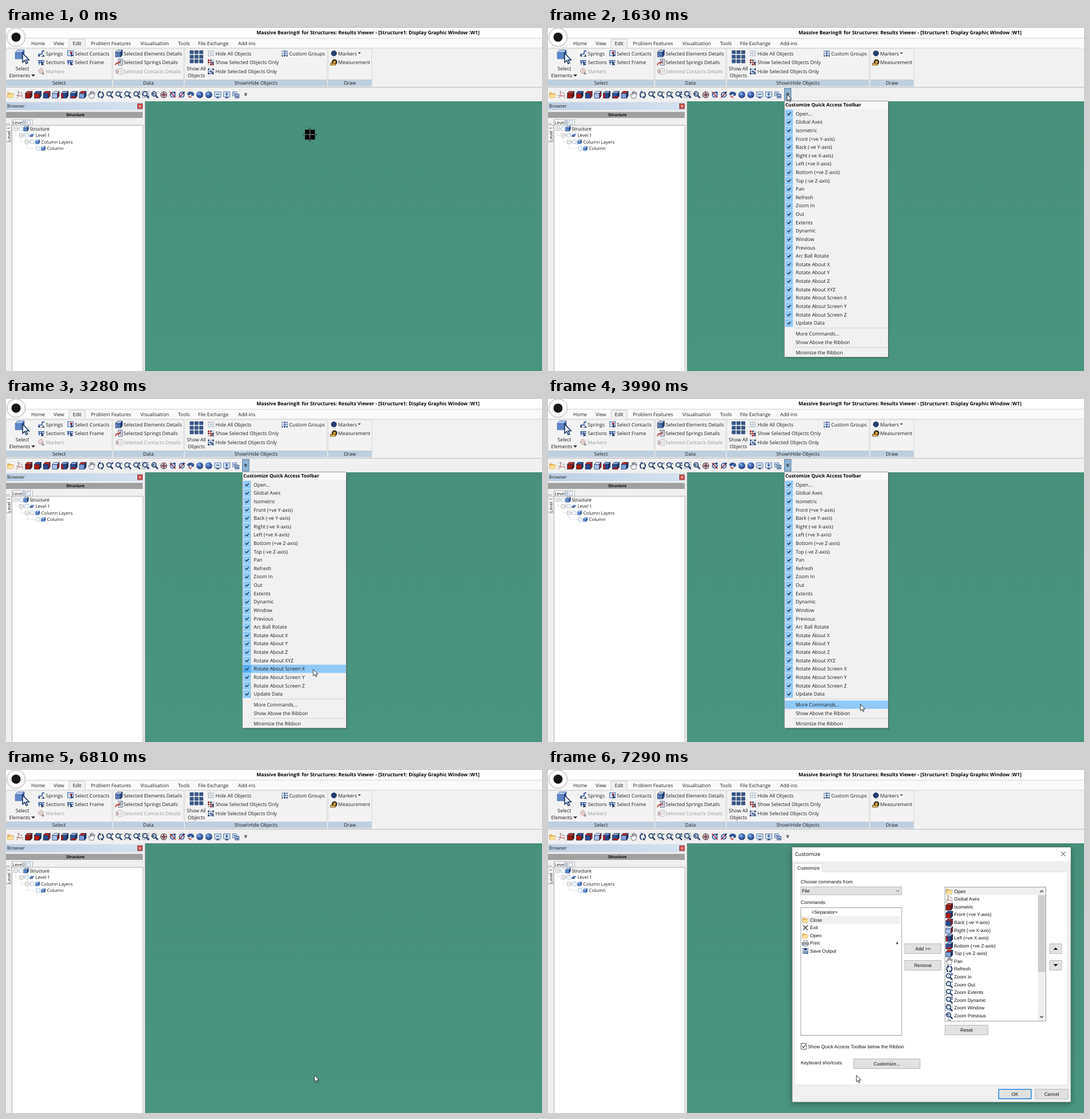
Write an HTML page that moves like this. It is 935 px wide and 599 px high and loops after 8 s.

```html
<!DOCTYPE html>
<html lang="en">
<head>
<meta charset="utf-8">
<title>Results viewer</title>
<style>
html, body { margin: 0; width: 100%; height: 100%; overflow: hidden; background: #f0f0f0; }
svg { display: block; text-rendering: geometricPrecision; }
text { font-family: "Open Sans", "Noto Sans", sans-serif; white-space: pre; }
text.a { font-family: "Liberation Sans", Arial, sans-serif; }
</style>
</head>
<body>
<svg id="stage" width="935" height="599" viewBox="0 0 935 599">
  <defs>
    <linearGradient id="green" x1="0" y1="0" x2="0" y2="1">
      <stop offset="0" stop-color="#48907b"/><stop offset="1" stop-color="#499580"/>
    </linearGradient>
    <linearGradient id="bar" x1="0" y1="0" x2="1" y2="0">
      <stop offset="0" stop-color="#bfd0e3"/><stop offset="1" stop-color="#d5e2ef"/>
    </linearGradient>
    <radialGradient id="ball" cx=".38" cy=".32" r=".7">
      <stop offset="0" stop-color="#8fb2e6"/><stop offset=".5" stop-color="#3a62ac"/><stop offset="1" stop-color="#1b3467"/>
    </radialGradient>
  </defs>
  <g id="base"></g>
  <g id="hover"></g>
  <g id="menu"></g>
  <g id="dialog" style="filter:drop-shadow(0 2px 4px rgba(0,0,0,.4))"></g>
  <g id="cross"></g>
  <g id="arrow"></g>
</svg>
<script>
const $ = id => document.getElementById(id);
const NAVY = '#1f3864', BLUE = '#34589c', RED = '#a81c14', INK = '#1c1c1c', DIM = '#9a9a9a';

// Markup helpers
const rect = (x, y, w, h, fill, stroke, extra = '') =>
  `<rect x="${x}" y="${y}" width="${w}" height="${h}" fill="${fill}" ${stroke ? `stroke="${stroke}" stroke-width=".8"` : ''} ${extra}/>`;
const shape = (d, fill, stroke = 'none', w = 1) =>
  `<path d="${d}" fill="${fill}" stroke="${stroke}" stroke-width="${w}"/>`;
const line = (d, stroke, w = 1) => shape(d, 'none', stroke, w);
const disc = (x, y, r, fill, stroke = 'none', w = 1) =>
  `<circle cx="${x}" cy="${y}" r="${r}" fill="${fill}" stroke="${stroke}" stroke-width="${w}"/>`;
// Text is placed by the middle of its capitals
const text = (x, y, str, size = 8.55, fill = INK, extra = '') =>
  `<text x="${x}" y="${y + size * .357}" font-size="${size}" fill="${fill}" ${extra}>${str.replace(/</g, '&lt;')}</text>`;
const mid = (x, y, str, size, fill, extra = '') => text(x, y, str, size, fill, 'text-anchor="middle" ' + extra);
const arial = (x, y, str, extra = '') => text(x, y, str, 8.25, '#111', 'class="a" ' + extra);
const at = (x, y, body, scale = 1) => `<g transform="translate(${x} ${y}) scale(${scale})">${body}</g>`;
const down = (x, y, r = 3) => shape(`M${x - r} ${y - r / 2}h${2 * r}l${-r} ${r}z`, '#222');
const grid = (x, y, w, h, gap, color) => {
  let s = '';
  for (let i = 0; i < 9; i++)
    s += rect(x + i % 3 * (w + gap), y + (i / 3 | 0) * (h + gap), w, h, Array.isArray(color) ? color[i % color.length] : color, '', 'rx=".8"');
  return s;
};

// Icons, about 12 px wide around 0,0
const cube = (front, side, top, edge = '#15294f') =>
  shape('M-6-2.5H3V6H-6z', front, edge, .7) +
  shape('M-6-2.5L-3-6H6L3-2.5z', top, edge, .7) +
  shape('M3-2.5L6-6V2.5L3 6z', side, edge, .7);
const zoom = mark =>
  line('M1.2 1L5.6 5.6', NAVY, 2.4) + disc(-1.3, -1.5, 3.8, '#dce6f3', NAVY, 1.6) + line(mark, NAVY, 1.1);
const turn = d => disc(0, 0, 4.2, '#c9d6ea', BLUE, 1.6) + line(d, RED, 1.4) + shape('M2-6L6-4L2.5-2z', NAVY);
const globe = disc(0, 0, 6, 'url(#ball)') + line('M-5.5 0H5.5M0-5.5Q3 0 0 5.5', '#6f93cf', .6);
const screen = d => rect(-5.5, -5, 11, 8.5, '#dbe7f5', BLUE) + line('M-3 5.3H3M0 3.5V5', NAVY, 1.3) + line(d, BLUE, 1.5);
const folder = shape('M-6-4h4l1 1.5h5V5H-6z', '#e0b35a') + shape('M-4-1H6L3.5 5H-6z', '#ffe3a0', '#cfa04a', .5);
const axes = line('M-2-6V2H6M-2 2L-6 6', '#b5554e', 1) + line('M-4-5.5h3M4 4l2 2M-6 1h3M1-4l4 3', '#55617c', .9);
const hand = shape('M-3 6L-6 0l1.4-.8L-3 1V-4.5h1.4V-1L-1-6H.5V-1L1.6-5.4H3L2.8-.5 4.3-3.5 5.5-3 4 3 2.5 6z', '#fff', '#4a4f5c', .8);
const swirl = line('M-2 5Q-7 0-2.5-4.5M2-5Q7 0 2.5 4.5', NAVY, 2) +
  shape('M-4.5-6H0V-2zM4.5 6H0V2z', NAVY);
const tools = [
  folder, axes,
  cube('#9c1a10', '#6d0d08', '#cf3a26'), cube('#b01c12', '#1c3768', '#34589c'),
  cube('#2a4a8c', '#a81c14', '#c22a1e'), cube('#a9c3ea', '#8e1a1a', '#dfeafa'),
  cube('#2a4a8c', '#16294f', '#7f9ccd') + rect(-6, -2, 3, 8, RED),
  cube('#2f5196', '#1b3467', '#8fabd8') + shape('M-6 6l3-3h8L3 6z', RED),
  cube('#7f9fd4', '#1c3768', '#c22a1e'),
  hand, swirl,
  zoom('M2.5-4.5h4M4.5-6.5v4'), zoom('M2.5-4.5h4'), zoom('M3-5.5l3 3M-6 5l2-2'),
  zoom('M2.5-4.5h4M4.5-6.5v4M2.5-1h4'),
  zoom('M0 0') + rect(-6, -6, 11, 11, 'none', NAVY, 'stroke-dasharray="1.5 1.2"'), zoom('M-3.5-1.5h4M-2-3l-1.5 1.5L-2 0'),
  disc(0, 0, 5.2, '#f0e4e4', '#555', 1.3) + line('M-5 0H5M0-5V5', RED, 1.2) + disc(0, 0, 2.4, 'none', NAVY, 1),
  turn('M-5-5L5 5'), turn('M-5 5L5-5'),
  shape('M-6-1Q-5-6 1-5 7-4 5 1L1 2Q3-1 0-1.5L-3 1z', BLUE, NAVY, .6) + line('M-4 2Q-2 5 1 4', RED, 1.6),
  globe, globe,
  screen('M-3-1H3'), screen('M0-4V2M-2.5-1h5'),
  rect(-5.5, -5, 7, 7, '#d7e3f3', BLUE) + rect(-1, -1, 6.5, 6.5, '#9db6dd', NAVY) + line('M1 3h3M-4-2h3', NAVY, 1.2)
];
const pointer = 'M0 0V11.5L2.7 9L4.4 13L6.2 12.2L4.5 8.4H8Z';

function drawBase() {
  let s = rect(0, 0, 935, 18, '#fff') + rect(0, 18, 935, 17, '#fafafa') + line('M34 17.8H935', '#c4c4c4', .8);
  s += text(826, 7.6, 'Massive Bearing® for Structures: Results Viewer - [Structure1: Display Graphic Window :W1]',
    8.55, '#000', 'font-weight="700" text-anchor="end"');
  s += rect(0, 35, 935, 68, '#f1f1f1') + line('M0 35H935', '#cfcfcf', .8) + line('M0 103.5H935', '#b2b2b2', .8);
  s += rect(110, 19.5, 28, 16, '#f1f1f1', '#c5c5c5', 'rx="1.5"') + rect(110.5, 33, 27, 3, '#f1f1f1');
  for (const [x, name] of [[44, 'Home'], [83, 'View'], [116.5, 'Edit'], [148, 'Problem Features'], [234.5, 'Visualisation'],
    [300, 'Tools'], [335, 'File Exchange'], [405, 'Add-ins']]) s += text(x, 27, name, 8.5);
  s += disc(17.5, 16, 16.3, '#f3f3f3', '#b5b5b5', 1) + disc(17.5, 16, 13.5, '#fff') + disc(17.5, 16, 8, '#161616');

  for (const [x, w, name] of [[0, 185, 'Select'], [187, 123, 'Data'], [312, 248, 'Show\\Hide Objects'], [562, 76, 'Draw']])
    s += rect(x, 36, w, 66, '#f3f3f3', '#d2d2d2') + rect(x, 90, w, 11.5, '#bfcfde') + mid(x + w / 2, 96, name);

  // Select
  s += at(24, 46, cube('#5f86c6', '#2c4f92', '#b4cbee', '#4a6fae'), 1.3) + at(29, 44, shape(pointer, '#e9f0fa', NAVY, 1.1), 1.4);
  s += mid(28.5, 71, 'Select') + text(5.5, 83, 'Elements') + down(47.5, 83, 3.6);
  const spring = line('M-5 4Q-6 0-2 1T1-2T5-4', BLUE, 1.7) + line('M0 5h5M2 2l3 3', NAVY, 1.2) + disc(-4, 4, 1.6, NAVY);
  const beam = line('M-6-3H5M-6 0H5M-4-3V4M0-3V4', BLUE, 1.4) + shape('M0-1V6l2-1.7 3 .2z', NAVY);
  const target = c => disc(-1, -1, 4, 'none', c, 1.1) + line('M-6-1H4M-1-6V4', c, .8) + shape('M1 0v6l2-1.5 3 .2z', '#8d8d8d');
  s += at(62, 44.5, spring) + text(69.5, 44.5, 'Springs') + at(62, 60, beam) + text(69.5, 60, 'Sections');
  s += at(62, 76, target('#c79a96')) + text(69.5, 76, 'Markers', 8.55, DIM);
  const contact = rect(-5.5, -5, 10, 9, '#cbd9ee', BLUE) + rect(-1, -3, 3.4, 3.4, RED) + shape('M0-1V6l2-1.7 3 .2z', NAVY);
  s += at(113, 44.5, contact) + text(120, 44.5, 'Select Contacts') + at(112.5, 60, beam) + text(120, 60, 'Select Frame');

  // Data
  const sheet = c => rect(-1, -5.5, 7, 10.5, '#fff', c) + line('M1-3h3.5M1-.5h3.5M1 2h3.5', c, .9);
  s += at(197, 44.5, cube('#6f93cf', '#20407c', '#c7d8f0') + line('M-4 0H2M-4 3H2', NAVY, 1.1)) + text(205, 44.5, 'Selected Elements Details');
  s += at(197, 60, sheet(NAVY) + line('M-6 5Q-5 0-2 1T2-3', RED, 1.5)) + text(205, 60, 'Selected Springs Details');
  s += at(197, 76, sheet('#aaa') + rect(-6, -4, 5, 8, '#c5c5c5') + rect(-3, -1, 3, 3, '#d49c98')) +
    text(205, 76, 'Selected Contacts Details', 8.55, DIM);

  // Show and hide
  s += grid(320.5, 39, 7, 6.6, 1.3, '#3a5685') + mid(332, 71, 'Show All') + mid(332, 83, 'Objects');
  const rows = [['Hide All Objects', '#bac4cf'], ['Show Selected Objects Only', [RED, '#33456b', '#bfc4cc', '#8f2020']],
    ['Hide Selected Objects Only', ['#26457d', '#aebbd0', NAVY, '#6d86b3']]];
  rows.forEach(([name, c], i) => {
    const y = 44.5 + 15.7 * i;
    s += grid(352, y - 5.2, 3, 2.8, .9, c) + text(365.5, y, name);
    if (i) s += at(359, y - 1, shape(pointer, NAVY, '#fff', .6), .5);
  });
  s += grid(480.5, 39.5, 3.2, 2.6, .9, ['#9cacc6', BLUE, '#7d92b8']) + line('M482 48v2M486 48v2M490 48v2', NAVY, 1.6) + text(494, 44.5, 'Custom Groups');

  // Draw
  s += disc(572, 44.3, 4.6, '#263f73', '#15294f', .7) + text(579.5, 44.5, 'Markers') + down(616.5, 44, 2.4);
  s += at(572, 60, disc(1, -.5, 4.8, '#2f2a1c') + disc(1, -.5, 2.4, '#d9a63a') + rect(-6, 1.5, 9, 3.4, '#e5b449', '#4b3a12')) + text(579.5, 60, 'Measurement');

  // Quick access row
  s += rect(0, 104, 935, 24, '#f0f0f0');
  tools.forEach((icon, i) => s += at(8.3 + 15.7 * i, 116.6, icon));

  // Browser panel
  s += rect(0, 128, 243, 471, '#f0f0f0') + rect(0, 129.5, 239, 14, 'url(#bar)') + text(2, 136.5, 'Browser', 8);
  s += rect(229.5, 132.2, 8.5, 8.8, '#c94f4a', '#8e3030') + line('M232 134.8l3.6 3.6M235.6 134.8l-3.6 3.6', '#fff', 1);
  s += rect(0, 146.5, 238.5, 10.5, '#a0a0a0') + mid(121, 151.6, 'Structure', 7.25, '#000', 'class="a" font-weight="700"');
  s += rect(10.5, 160, 36, 10, '#fafafa', '#a5a5a5') + text(11.5, 165.5, 'Leve', 7.8) + text(0, 165.5, '...', 8);
  s += rect(29, 162, 5.5, 6, '#e6edf5', '#8097b3') + line('M30.5 163.5l2 1.5-2 1.5', '#444', .7) + rect(37, 162, 5.5, 6, '#fff', '#8aa3c0');
  s += rect(0, 170, 10, 29, '#fafafa', '#a5a5a5') + at(4.8, 185.5, `<g transform="rotate(-90)">${mid(0, 0, 'Level 1', 7.9)}</g>`);
  s += rect(10.5, 170, 228.5, 430, '#fff', '#9a9a9a') + rect(41, 170.6, 35.5, 10.5, '#efefef');
  ['Structure', 'Level 1', 'Column Layers', 'Column'].forEach((name, i) => {
    const x = 10 * i, y = 175.8 + 11.5 * i;
    if (i) s += line(`M${x + 6.8} ${y - 8}V${y}h${i < 3 ? 6 : 15}`, '#cfcfcf', .6);
    if (i < 3) s += rect(x + 13.5, y - 3, 6.4, 6.2, '#fff', '#a8a8a8') + line(`M${x + 15} ${y}h3.4M${x + 20} ${y}h3`, '#777', .7);
    s += rect(x + 23, y - 3, 6, 6, '#fff', '#9db8d6');
    s += at(x + 35, y, i === 1 ? shape('M-6 2L-2-3H6L3 2z', '#5f88cc', BLUE, .9) + shape('M-6 2H3V4H-6z', NAVY)
      : cube('#5f88cc', '#23427c', '#b6cdef', i ? '#5478b4' : NAVY), i ? .62 : .72);
    s += text(x + 41.5, y, name, 7.9);
  });
  s += line('M242.5 128V599', '#a8a8a8', 1) + rect(243, 128, 692, 471, 'url(#green)');
  $('base').innerHTML = s;
}

const items = ['Open...', 'Global Axes', 'Isometric', 'Front (+ve Y-axis)', 'Back (-ve Y-axis)', 'Right (-ve X-axis)',
  'Left (+ve X-axis)', 'Bottom (+ve Z-axis)', 'Top (-ve Z-axis)', 'Pan', 'Refresh', 'Zoom In', 'Out', 'Extents', 'Dynamic',
  'Window', 'Previous', 'Arc Ball Rotate', 'Rotate About X', 'Rotate About Y', 'Rotate About Z', 'Rotate About XYZ',
  'Rotate About Screen X', 'Rotate About Screen Y', 'Rotate About Screen Z', 'Update Data'];
const STEP = 14.62, MORE = 26;
const rowY = i => i === MORE ? 534 : 149.6 + STEP * i;

function drawMenu() {
  let s = rect(414, 129, 181, 447.5, '#000', '', 'opacity=".28"') + rect(412.4, 127.4, 181, 447.4, '#f1f1f1', '#8b8b8b');
  s += rect(413, 128, 180, 13.5, '#fafafa') + text(414, 134.3, 'Customize Quick Access Toolbar', 8.3, '#000', 'font-weight="700"');
  s += rect(413, 0, 180, STEP - .2, '#91c9f7', '', 'id="lit"');
  items.forEach((name, i) => {
    const y = rowY(i);
    s += rect(413.6, y - 6.9, 13.6, 13.8, '#91c9f7') + line(`M417.6 ${y}l2.1 2.1 3.8-4.2`, '#10243c', 1.3) + text(432, y, name, 8.6);
  });
  s += rect(413.6, 0, 13.6, 13.8, '#56aff2', '', 'id="tick"') + line('M417.6 0l2.1 2.1 3.8-4.2', '#10243c', 1.3).replace('<path', '<path id="mark"');
  s += line('M430 524H592M430 557.8H592', '#d0d0d0', .9);
  s += text(432, 534, 'More Commands...', 8.6) + text(432, 548.5, 'Show Above the Ribbon', 8.6) + text(432, 567.2, 'Minimize the Ribbon', 8.6);
  $('menu').innerHTML = s;
  $('hover').innerHTML = rect(412.4, 105.4, 11.6, 20.6, '#8fb4d2', '#3f6a92');
}

function drawDialog() {
  const button = (x, y, w, h, name, edge = '#adadad') =>
    rect(x, y, w, h, '#e1e1e1', edge) + arial(x + w / 2, y + h / 2, name, 'text-anchor="middle"');
  let s = rect(426, 135, 486, 445, '#f0f0f0', '#7b8a86') + rect(426.4, 135.4, 485.2, 23.6, '#fff');
  s += text(431, 147, 'Customize', 9, '#000') + line('M895 142.6l8 8M903 142.6l-8 8', '#222', .9);
  s += rect(430.5, 178, 475.5, 372, '#fff', '#dcdcdc') + rect(430.5, 163.5, 47.5, 15, '#fff', '#d9d9d9') + rect(431, 176, 46.6, 4, '#fff');
  s += arial(435, 170.6, 'Customize') + arial(441, 194.7, 'Choose commands from:') + arial(441, 231, 'Commands:');
  s += rect(441, 204, 176, 14, '#e1e1e1', '#adadad') + arial(443, 211, 'File') + line('M607 209.6l3 3 3-3', '#444', .9);
  s += rect(441, 240.5, 176, 223, '#fff', '#828790') + rect(442, 255, 174.5, 13.5, '#f0f0f0');
  const cross = line('M-4.5-4.5L4.5 4.5M4.5-4.5L-4.5 4.5', '#444', 1.7);
  const printer = rect(-3.5, -5, 7, 4, '#fff', '#666') + rect(-6, -1.5, 12, 5, '#a4adba', '#566') + rect(-3.5, 2, 7, 3.4, '#dfe9f7', '#666');
  const disk = rect(-5, -5, 10, 10, '#c9d8ec', BLUE) + rect(-2.5, -5, 5, 3.5, NAVY) + line('M-3 1h4M-3 3h3', NAVY, 1) + disc(3, 3, 2, '#8ba6d2', NAVY, .8);
  [['<Separator>', ''], ['Close', folder], ['Exit', cross], ['Open', folder], ['Print', printer], ['Save Output', disk]].forEach(([name, icon], i) => {
    const y = 248.3 + 13.55 * i;
    s += at(449, y, icon, .92) + arial(icon ? 457 : 459.5, y, name);
  });
  s += shape('M608 300.2v4.6l2.8-2.3z', '#111');
  s += button(622.4, 303.4, 63.2, 17.2, 'Add >>') + button(622.4, 332.4, 63.2, 17.2, 'Remove');
  s += rect(692.5, 204.4, 176, 234, '#fff', '#828790') + rect(693.2, 205, 161, 13.3, '#f0f0f0');
  const zooms = { 12: 'Zoom Out', 13: 'Zoom Extents', 14: 'Zoom Dynamic', 15: 'Zoom Window', 16: 'Zoom Previous' };
  for (let i = 0; i < 17; i++) {
    const y = 211.7 + 13.58 * i;
    s += at(700, y, tools[i]) + arial(708.5, y, zooms[i] || items[i].replace('...', ''));
  }
  s += line('M697 437.4Q700 435.6 703 437.4', '#555', 1.1);
  s += rect(854.5, 205, 13.4, 233, '#f0f0f0') + rect(854.8, 218.5, 12.8, 134.5, '#cdcdcd');
  s += line('M858.2 213.5l3-3 3 3M858.2 429.5l3 3 3-3', '#444', 1.3);
  s += button(875, 303.4, 21, 17.2, '') + shape('M881.5 314h8l-4-4z', '#111') + button(875, 332.4, 21, 17, '') + shape('M881.5 339h8l-4 4z', '#111');
  s += button(692.5, 445.4, 75, 17.2, 'Reset');
  s += rect(441.3, 477.5, 9.6, 10, '#fff', '#333') + line('M443.4 482.4l2.2 2.4 3.8-5', '#222', 1.1);
  s += arial(453.5, 482.8, 'Show Quick Access Toolbar below the Ribbon') + arial(441, 510.6, 'Keyboard shortcuts:');
  s += button(533, 504.4, 116, 17.2, 'Customize...') + button(786, 557.6, 57, 16.6, 'OK', '#0078d7') +
    rect(786.3, 557.9, 56.4, 16, 'none', '#0078d7') + button(850, 557.6, 57, 16.6, 'Cancel');
  $('dialog').innerHTML = s;
}

drawBase();
drawMenu();
drawDialog();
// The drop-down mark sits above its own highlight
$('hover').insertAdjacentHTML('afterend', line('M415.6 114.3h5', '#111', 1) + down(418.1, 117.2, 2.6));
$('arrow').innerHTML = shape(pointer, '#fff', '#111', .85);
$('cross').innerHTML = rect(-8.4, -8.4, 17.2, 17.2, '#000') + line('M-11.5 0H12M0-12V12', '#111', 2.2) + line('M-11 0H11.5M0-11.5V11.5', '#b9c4c0', .7);

// Motion: the screen refreshes in bursts of [first, last, count], on a 10 ms clock
const LOOP = 8000;
const bursts = [[370, 1010, 10], [1390, 2110, 10], [2200, 2970, 11], [3040, 3760, 10], [3860, 3990, 3], [5070, 5220, 3]];
const path = [[300, 530, 186], [1010, 417, 116], [1630, 417, 116], [2110, 505, 172], [2500, 540, 279], [2970, 537, 405],
  [3280, 536, 472], [3760, 540, 523.5], [3990, 545, 533], [4990, 545, 533], [5220, 538, 533]];

function snap(t) {
  let last = 0;
  for (const [a, b, n] of bursts)
    for (let k = 0; k < n; k++) {
      const step = a + 10 * Math.floor((b - a) * k / (n - 1) / 10);
      if (step <= t) last = step;
    }
  return last;
}

function place(t) {
  if (t <= path[0][0]) return path[0].slice(1);
  const i = path.findIndex(p => p[0] >= t);
  if (i < 0) return path[path.length - 1].slice(1);
  const [a, b] = [path[i - 1], path[i]];
  let p = (t - a[0]) / (b[0] - a[0]);
  if (i === 1) p = p * p * (3 - 2 * p);
  return [a[1] + (b[1] - a[1]) * p, a[2] + (b[2] - a[2]) * p];
}

const show = (id, on) => $(id).setAttribute('visibility', on ? 'visible' : 'hidden');

function render(t) {
  const now = snap(t), [x, y] = place(now);
  const inView = y >= 128 && t < 1010;
  show('cross', inView);
  show('arrow', !inView);
  $(inView ? 'cross' : 'arrow').setAttribute('transform', `translate(${x} ${y})`);
  show('hover', !inView && t < 6810);

  const open = t >= 1390 && t < 6810;
  show('menu', open);
  $('menu').setAttribute('opacity', t < 1470 ? .4 : t < 1550 ? .75 : t < 1630 ? .95 : 1);
  // The lit row trails the pointer slightly
  const hy = place(now - 30)[1];
  const row = hy > 526 ? MORE : Math.min(25, Math.floor((hy - 142.3) / STEP));
  const lit = open && t >= 1630 && row >= 0;
  show('lit', lit);
  show('tick', lit && row < MORE);
  show('mark', lit && row < MORE);
  $('lit').setAttribute('y', rowY(row) - STEP / 2);
  $('tick').setAttribute('y', rowY(row) - 6.9);
  $('mark').setAttribute('transform', `translate(0 ${rowY(row)})`);

  show('dialog', t >= 7090);
  const [k, alpha] = t < 7230 ? [.957, .6] : t < 7290 ? [.99, .95] : [1, 1];
  $('dialog').setAttribute('transform', `translate(669 357.5) scale(${k}) translate(-669 -357.5)`);
  $('dialog').setAttribute('opacity', alpha);
}

const start = performance.now();
(function tick() {
  render((performance.now() - start) % LOOP);
  requestAnimationFrame(tick);
})();
</script>
</body>
</html>
```
